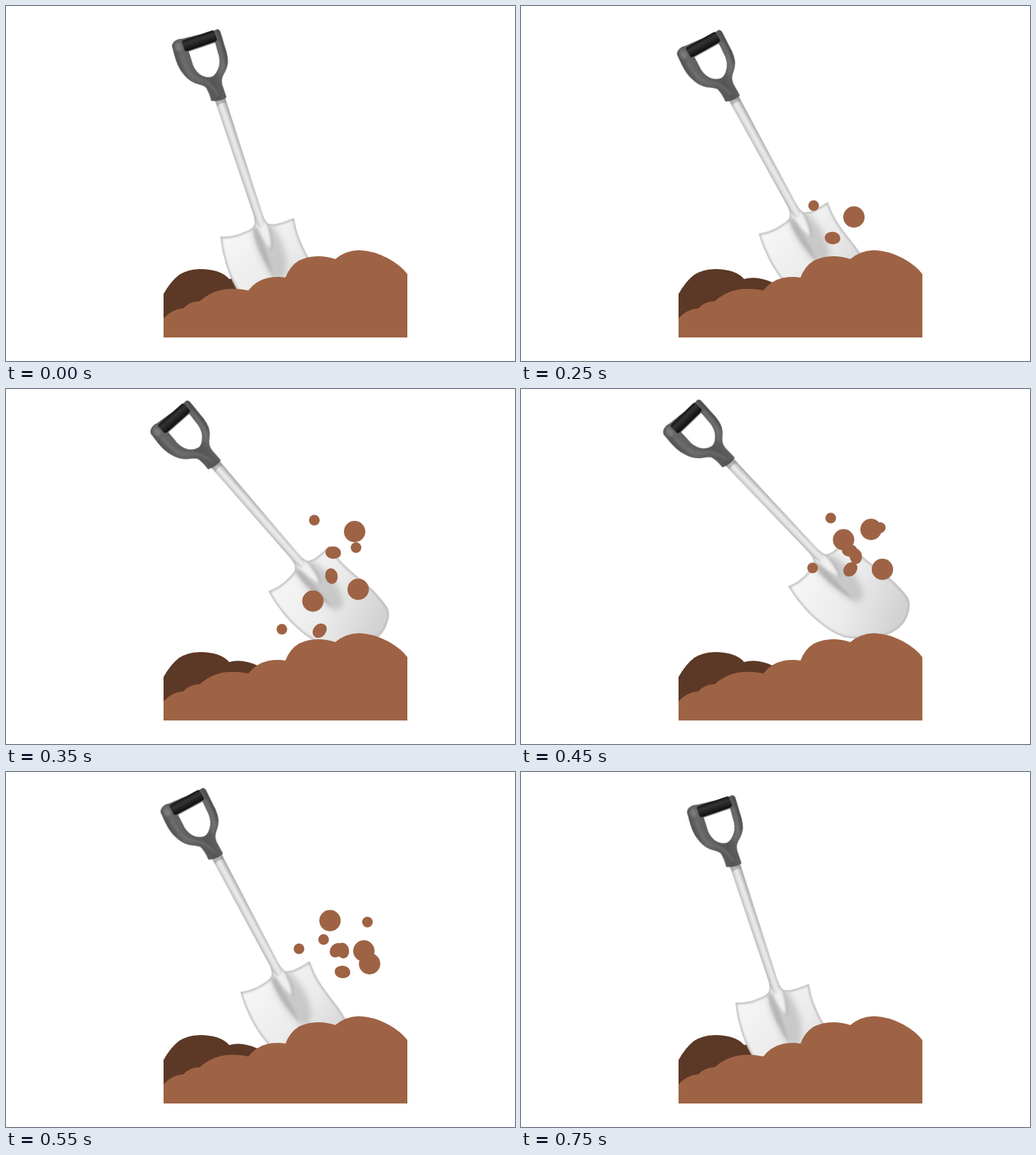
Write an HTML page that moves like this. It is 714 by 498 pixels and loops after 800 ms.

```html
<!DOCTYPE html>
<html lang="en">
<head>
<meta charset="utf-8">
<title>Digging shovel</title>
<style>
  html, body { margin: 0; width: 100%; height: 100%; overflow: hidden; background: #fff; }
  svg { display: block; width: 714px; height: 498px; }

  .soil { fill: #9e6344; }
  .pit { fill: #5c3826; }

  .shovel { animation: dig 800ms infinite; }
  .air { animation: show 800ms step-end infinite; }
  .clods { --dip: 0px; animation: toss 800ms step-end infinite; }
  .first { animation-delay: -550ms; }
  .second { animation-delay: -500ms; }
  .third { animation-delay: -450ms; --dip: -10px; }

  /* push in, hold, lever up, hover, sink back */
  @keyframes dig {
    0%     { transform: translate(300px, 133px) rotate(-18.8deg); animation-timing-function: steps(2); }
    12.5%  { transform: translate(305px, 154px) rotate(-18.8deg); animation-timing-function: step-end; }
    31.25% { transform: translate(298.7px, 131.9px) rotate(-29.1deg); animation-timing-function: steps(2); }
    43.75% { transform: translate(294.5px, 107.9px) rotate(-41.3deg); animation-timing-function: steps(2); }
    56.25% { transform: translate(293.4px, 104.7px) rotate(-43.9deg); animation-timing-function: steps(2); }
    68.75% { transform: translate(296px, 120.9px) rotate(-28.5deg); animation-timing-function: steps(4); }
    93.75%, 100% { transform: translate(300px, 133px) rotate(-18.8deg); animation-timing-function: step-end; }
  }

  @keyframes show {
    0%, 93.75%, 100% { opacity: 0; }
    31.25% { opacity: 1; }
  }

  /* each handful flies the same arc, started at its own time */
  @keyframes toss {
    0%     { transform: translate(0, var(--dip)); }
    6.25%  { transform: translate(10px, -75px); }
    12.5%  { transform: translate(22px, -96px); }
    18.75% { transform: translate(23px, -103px); }
    25%    { transform: translate(24px, -99px); }
    31.25% { transform: translate(26px, -87px); }
    37.5%  { transform: translate(35px, -45px); }
    43.75% { transform: translate(38px, 0); }
    50%    { transform: translate(41px, 43px); }
    56.25% { transform: translate(44px, 80px); visibility: visible; }
    62.5%, 100% { transform: translate(44px, 80px); visibility: hidden; }
  }
</style>
</head>
<body>
<svg viewBox="0 0 714 498" xmlns="http://www.w3.org/2000/svg">
  <defs>
    <linearGradient id="steel">
      <stop offset="0" stop-color="#b4b4b4"/>
      <stop offset=".25" stop-color="#dedede"/>
      <stop offset=".5" stop-color="#ececec"/>
      <stop offset=".72" stop-color="#d0d0d0"/>
      <stop offset="1" stop-color="#9c9c9c"/>
    </linearGradient>
    <linearGradient id="sheet" x1=".2" y1="0" x2=".55" y2="1">
      <stop offset="0" stop-color="#f7f7f7"/>
      <stop offset=".55" stop-color="#ebebeb"/>
      <stop offset="1" stop-color="#d2d2d2"/>
    </linearGradient>
    <linearGradient id="rubber" x2="0" y2="1">
      <stop offset="0" stop-color="#161616"/>
      <stop offset=".35" stop-color="#343434"/>
      <stop offset="1" stop-color="#0e0e0e"/>
    </linearGradient>
    <linearGradient id="plastic">
      <stop offset="0" stop-color="#525252"/>
      <stop offset=".15" stop-color="#666"/>
      <stop offset=".55" stop-color="#555"/>
      <stop offset=".85" stop-color="#6a6a6a"/>
      <stop offset="1" stop-color="#484848"/>
    </linearGradient>
    <filter id="soft" x="-50%" y="-50%" width="200%" height="200%"><feGaussianBlur stdDeviation="4"/></filter>
    <filter id="hazy" x="-50%" y="-50%" width="200%" height="200%"><feGaussianBlur stdDeviation="1.6"/></filter>
    <path id="blade" d="M-60.5 181 Q-46 187 -31 186 Q-18 186 -13 183 Q-8 180 -7 170 L5 170 Q5.500 182 9 186
      Q16 190 26 190 Q36 190 45 189.500 Q42 205 43 221 C44 240 49 258 50 275 Q51 297 49 309
      Q46 317 38 322 Q25 331 11 330 Q0 329 -11 324 Q-24 316 -36 306 Q-46 296 -53 287
      Q-59 275 -62 261 Q-66 242 -65.500 222 Q-65 200 -60.500 181Z"/>
    <clipPath id="inBlade"><use href="#blade"/></clipPath>
    <clipPath id="ground"><path d="M0 0H714V464H0Z"/></clipPath>
  </defs>

  <path class="pit" d="M221 465V404Q231 386 243 377Q256 369 272 369Q301 369 313 383Q331 378 353 388V420L300 465Z"/>

  <g clip-path="url(#ground)">
    <g class="shovel">
      <use href="#blade" fill="url(#sheet)"/>
      <g clip-path="url(#inBlade)">
        <path d="M-13 180Q-22 215 -9 262Q2 272 12 255Q24 230 14 190Z" fill="#bcbcbc" opacity=".75" filter="url(#soft)"/>
        <path d="M-14 184Q-20 212 -8 258Q-5 232 -9 186Z" fill="#a4a4a4" opacity=".55" filter="url(#hazy)"/>
        <path d="M-6 168Q-8 200 0 219Q9 202 5 168Z" fill="#efefef" filter="url(#hazy)"/>
        <path d="M8 184Q10 207 1 221" fill="none" stroke="#a8a8a8" stroke-width="2" opacity=".6" filter="url(#hazy)"/>
        <use href="#blade" fill="none" stroke="#b4b4b4" stroke-width="3" filter="url(#hazy)"/>
      </g>
      <use href="#blade" fill="none" stroke="#bdbdbd" stroke-width=".8"/>

      <path d="M-6.500 -6H8.500L5.500 170Q5 181 2 187H-4Q-7 181 -7 170Z" fill="url(#steel)"/>
      <path d="M-6.500 -3H8.500L8 6Q1 2 -6 6Z" fill="#888" opacity=".5"/>

      <path fill="url(#plastic)" fill-rule="evenodd" stroke="#444" stroke-width=".8"
        d="M-11 -4Q0 1 10 -2L10 -21Q11 -28 15 -32Q24 -39 27.500 -47Q30 -54 30.500 -62L31.500 -92
        Q31 -96 28 -96L22 -95L-22 -99Q-28 -101 -32 -99.500Q-38 -98 -38.600 -93L-39.500 -77
        Q-40 -63 -36.600 -54Q-33 -42 -25 -35Q-16 -29 -12.500 -25Q-10 -18 -11 -4Z
        M-19.500 -80H20.500L19.500 -60Q18 -48 11 -41.500Q5 -35 -1 -35Q-7 -36 -12.500 -41Q-19 -48 -20 -59Z"/>
      <path d="M-31 -80Q-33 -48 -17 -37Q-3 -29 0 -8M25 -80Q26 -48 11 -35" fill="none" stroke="#7c7c7c"
        stroke-width="3" opacity=".6" filter="url(#hazy)"/>
      <rect x="-24" y="-97" width="48" height="16" rx="3" fill="url(#rubber)"/>
      <ellipse cx="-31" cy="-90" rx="4.500" ry="6" fill="#858585" opacity=".7" filter="url(#hazy)"/>
    </g>
  </g>

  <path class="soil" d="M221 465V438Q233 425 249 424Q258 414 272 414Q285 402 303 398Q321 395 340 399
    Q351 385 367 381.500Q381 379 392 381Q398 365 411 357Q434 346 462 355Q476 343 495 342.500
    Q515 343 536 354Q554 364 563 376V465Z"/>

  <g class="air soil">
    <g class="clods first">
      <circle cx="410.500" cy="280" r="7.500"/>
      <circle cx="467" cy="296" r="15"/>
      <ellipse cx="437" cy="325.500" rx="11" ry="8.800" transform="rotate(6 437 325.500)"/>
    </g>
    <g class="clods second">
      <circle cx="481" cy="297.500" r="7.500"/>
      <circle cx="484" cy="356" r="15"/>
      <ellipse cx="446.500" cy="337.500" rx="8.700" ry="11" transform="rotate(-12 446.500 337.500)"/>
    </g>
    <g class="clods third">
      <circle cx="387" cy="347" r="7.500"/>
      <circle cx="430.500" cy="307.500" r="15"/>
      <ellipse cx="440" cy="349" rx="11" ry="8.800" transform="rotate(-48 440 349)"/>
    </g>
  </g>
</svg>
</body>
</html>
```
